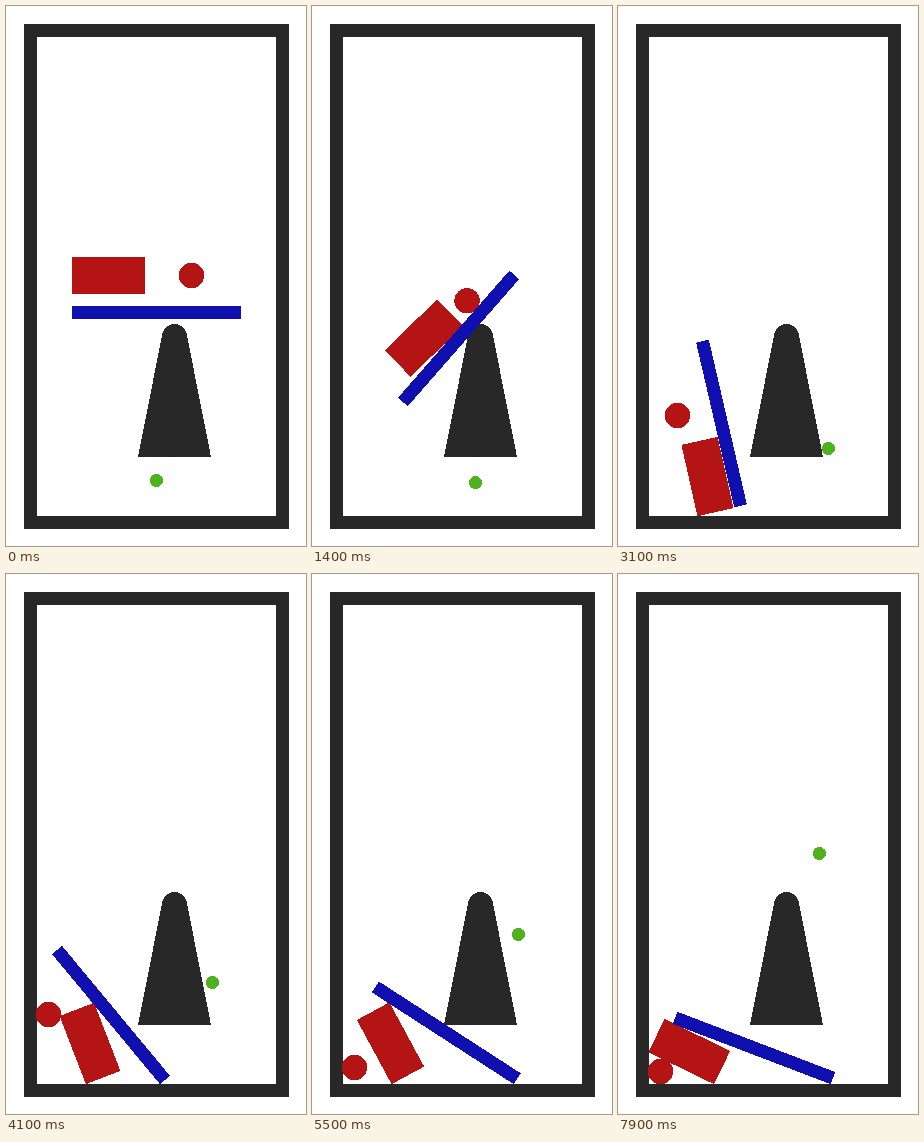
Write an HTML page that moves like this. It is 300 px wide and 540 px high and loops after 8 s.

```html
<!DOCTYPE html>
<html lang="en">
<head>
<meta charset="utf-8">
<title>Tipping beam</title>
<style>
  html, body { margin: 0; width: 100%; height: 100%; overflow: hidden; background: #fff; }
  svg { display: block; width: 100%; height: 100%; shape-rendering: crispEdges; }
  .dark { fill: #282828; }
  .red { fill: #b51414; }
  .blue { fill: #1010b0; }
  .green { fill: #50b11e; }
</style>
</head>
<body>
<svg viewBox="0 0 300 540">
  <rect x="24.5" y="24.5" width="252" height="492" fill="none" stroke="#282828" stroke-width="13"/>
  <circle id="dot" class="green" r="6.5"/>
  <g class="dark">
    <circle cx="168.5" cy="330.5" r="12.5"/>
    <path d="M156.2 328.5H180.8L205 451H132Z"/>
  </g>
  <rect id="block" class="red" x="-36.5" y="-18.5" width="73" height="37"/>
  <circle id="ball" class="red" r="12.7"/>
  <rect id="beam" class="blue" x="-84.5" y="-6.5" width="169" height="13"/>
</svg>
<script>
  const LOOP = 8000, STEP = 100, FLOOR = 510.2;

  // Key moments in seconds: start, touch, slide, land, wedge, lean, topple, end
  const times = [0, .7, 2, 3.1, 4.1, 5.5, 6.7, 7.9];

  // A shorter list holds its last value. Falls aim below the floor, which stops them.
  const block = {
    x: [102.5, 119.5, 102, 89.5, 84, 78.5, 73, 71.3],
    y: [269.5, 284.5, 397, 570],
    angle: [0, 0, -91.2, -102.6, -111.1, -118.4, -135, -154.1]
  };
  const beam = {
    x: [150.5, 149.5, 138.7, 103.5, 105, 134.3, 135, 136],
    y: [306.5, 314.5, 355.7, 417.5, 500],
    angle: [0, -10, -82.9, -103, -129.7, -147.1, -152, -159.1]
  };
  const ball = {
    x: [185.5, 177.5, 123.5, 59.5, 42.5],
    y: [269.5, 292.5, 317.5, 409.5, 440.5, 493.5, 640]
  };
  const dot = {
    x: [150.5, 148.5, 183.5, 210.5, 206.5, 206.5, 204, 201.5],
    y: [474.5, 475.5, 472.5, 442.5, 408.5, 360.5, 320, 279.5]
  };

  const at = (list, i) => list[Math.min(i, list.length - 1)];
  const span = i => times[i + 1] - times[i];
  const rate = (list, i) => (at(list, i + 1) - at(list, i)) / span(i);

  // Parabolic slope at key i, flat at turning points
  function slope(list, i) {
    const last = times.length - 1, j = Math.min(Math.max(i, 1), last - 1);
    const a = rate(list, j - 1), b = rate(list, j), turning = a * b <= 0;
    const bend = turning ? 0 : (b - a) / (span(j - 1) + span(j));
    if (i === 0) return a - bend * span(0);
    if (i === last) return b + bend * span(j);
    return turning ? 0 : a + bend * span(j - 1);
  }

  function sample(list, t) {
    let i = 0;
    while (i < times.length - 2 && t >= times[i + 1]) i++;
    const h = span(i), u = (t - times[i]) / h, v = 1 - u;
    return v * v * (1 + 2 * u) * at(list, i) + u * u * (3 - 2 * u) * at(list, i + 1)
      + h * u * v * (v * slope(list, i) - u * slope(list, i + 1));
  }

  const pose = (track, t) => ({
    x: sample(track.x, t),
    y: sample(track.y, t),
    angle: track.angle ? sample(track.angle, t) : 0
  });

  // Keeps a box of the given half sizes above the floor
  function rest(p, halfW, halfH) {
    const a = p.angle * Math.PI / 180;
    const reach = halfW * Math.abs(Math.sin(a)) + halfH * Math.abs(Math.cos(a));
    return { ...p, y: Math.min(p.y, FLOOR - reach) };
  }

  // Places a point given along and across another pose
  function ride(p, along, across) {
    const a = p.angle * Math.PI / 180, c = Math.cos(a), s = Math.sin(a);
    return { x: p.x + along * c - across * s, y: p.y + along * s + across * c, angle: 0 };
  }

  function place(id, { x, y, angle }) {
    document.getElementById(id).setAttribute("transform", `translate(${x} ${y}) rotate(${angle})`);
  }

  function draw(t) {
    const plank = rest(pose(beam, t), 84.5, 6.5);
    const p = (t - times[1]) / span(1);
    const riding = p >= 0 && p <= 1;
    place("beam", plank);
    place("block", rest(pose(block, t), 36.5, 18.5));
    place("ball", riding ? ride(plank, 31.4 + 4.6 * p, -16.8 - 3 * p) : rest(pose(ball, t), 0, 12.7));
    place("dot", pose(dot, t));
  }

  const start = performance.now();
  function tick() {
    const ms = (performance.now() - start) % LOOP;
    draw(Math.floor(ms / STEP) * STEP / 1000);
    requestAnimationFrame(tick);
  }
  tick();
</script>
</body>
</html>
```
